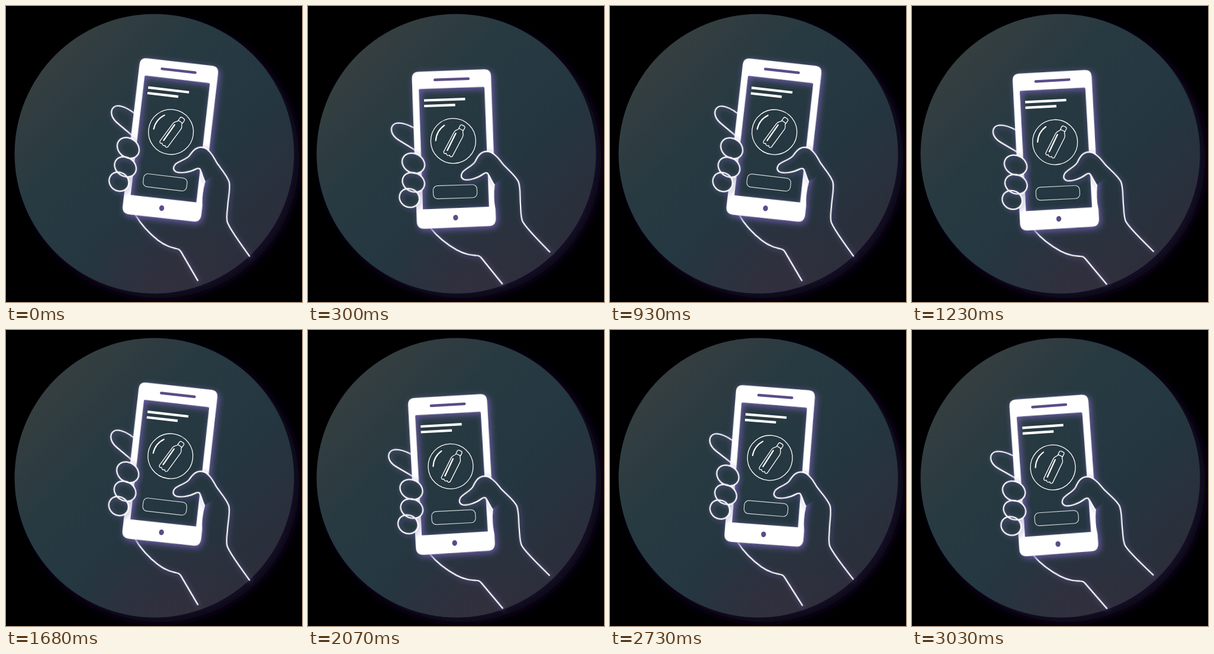
Animation, 500 px wide and 500 px high, one loop 3180 ms. Source, as an HTML page:

```html
<!DOCTYPE html>
<html lang="en">
<head>
<meta charset="utf-8">
<title>Phone in hand</title>
<style>
  html, body { margin: 0; width: 100%; height: 100%; overflow: hidden; background: #000; }
  svg { display: block; width: 100%; height: 100%; }
</style>
</head>
<body>
<svg viewBox="0 0 500 500" fill="none" stroke-linecap="round" stroke-linejoin="round">
  <defs>
    <linearGradient id="base" x1="0.1" y1="0.15" x2="0.85" y2="0.9">
      <stop offset="0" stop-color="#373f40"/>
      <stop offset=".3" stop-color="#283a41"/>
      <stop offset=".65" stop-color="#243640"/>
      <stop offset="1" stop-color="#2c2d3a"/>
    </linearGradient>
    <radialGradient id="tint" cx=".55" cy="1.02" r=".35">
      <stop offset="0" stop-color="#352f3e" stop-opacity=".8"/>
      <stop offset="1" stop-color="#352f3e" stop-opacity="0"/>
    </radialGradient>
    <filter id="halo" x="-20%" y="-20%" width="140%" height="140%">
      <feGaussianBlur stdDeviation="10"/>
    </filter>
    <filter id="glow" x="-20%" y="-20%" width="140%" height="140%">
      <feDropShadow dx="3" dy="3" stdDeviation="6" flood-color="#6f5fae"/>
    </filter>
    <filter id="lineGlow" x="-20%" y="-20%" width="140%" height="140%">
      <feDropShadow dx="2" dy="2" stdDeviation="4" flood-color="#6f5fae"/>
    </filter>
    <g id="fingertips">
      <ellipse cx="181.500" cy="262" rx="19.800" ry="16.200" transform="rotate(30 181.500 262)"/>
      <ellipse cx="181" cy="294.200" rx="19.300" ry="15.800" transform="rotate(26 181 294.200)"/>
      <ellipse cx="173.500" cy="320.500" rx="17.200" ry="15.500" transform="rotate(30 173.500 320.500)"/>
    </g>
  </defs>

  <circle cx="260" cy="258" r="235" fill="#150f2a" filter="url(#halo)"/>
  <circle cx="250.500" cy="249.500" r="236" fill="url(#base)"/>
  <circle cx="250.500" cy="249.500" r="236" fill="url(#tint)"/>

  <g id="hand" stroke="#fff" stroke-width="2.200">
    <!-- index finger and forearm, behind the phone -->
    <path filter="url(#lineGlow)" d="M183 202C176 198 168 194 158 193.500C149 193.500 145 199 145.500 206C147 216 155 221 163 226L185 240
      M209 373C222 390 237 401 252 410C266 418 276 419 285 420Q290 420 293 424L327.500 468.500"/>

    <!-- phone body with the screen cut out -->
    <path filter="url(#glow)" fill="#fff" stroke="none" fill-rule="evenodd"
      d="M181.800 119Q181.800 108 193 107.700L304 105.800Q315 105.800 315.300 117L317.500 250L318 302Q315 322 318.500 342L318.800 358Q318.500 370.300 307.500 370.500L198 373Q185.500 373 185.300 361Z
         M193 138.500Q193 137 195 136.800L302 135.200Q304 135.200 304 137L307.800 338L196 340.200Z"/>
    <path d="M220.500 122L277 121" stroke="#5a4d88" stroke-width="4.500"/>
    <ellipse cx="251" cy="355.300" rx="4.200" ry="4.800" fill="#5a4d88" stroke="none"/>

    <!-- screen content -->
    <path d="M201.500 156.300L271 155.300M201.500 165.800L254 165" stroke-width="4.200" stroke-linecap="butt"/>
    <rect x="214" y="300.500" width="74" height="22" rx="7.500" stroke-width="1.200" stroke-opacity=".8" transform="rotate(-.7 251 311)"/>
    <circle cx="249.500" cy="225.700" r="38" stroke-width="1.300"/>
    <path d="M220 224.500C221 213 226 205 235 199" stroke-width="2.100"/>
    <g transform="translate(265 203) rotate(29)" stroke-width="1.300">
      <path d="M-4.300 4V-1Q-4.300-3.500-1.500-3.500H1.500Q4.300-3.500 4.300-1V4Z"/>
      <path d="M-3.700 4C-4 8-8.300 8-8.300 14V51Q-6 55-3.300 51.500Q0 55.500 3.300 51.500Q6 55 8.300 51V14C8.300 8 4 8 3.700 4"/>
      <path d="M-4.800 14L-4 46" stroke-width="2.300"/>
    </g>

    <!-- fingertips over the left edge -->
    <use href="#fingertips" fill="#263840" stroke="none"/>
    <use href="#fingertips" filter="url(#lineGlow)"/>

    <!-- thumb over the right edge, then the outer forearm -->
    <path fill="#25363f" stroke="none" d="M317 301L306 281Q303 280 300 282C290 289 274 294 266 291Q259 287 264 279C270 272 281 269 286 261C291 251 296 245 305 244.300Q313 244.500 320 251L334 268L330 290Z"/>
    <path filter="url(#lineGlow)" d="M317 301C312 293 310 286 306 281Q303 280 300 282C290 289 274 294 266 291Q259 287 264 279C270 272 281 269 286 261C291 251 296 245 305 244.300Q313 244.500 319 250.500C327 257 329 262 334 268C342 277 352 285 358 296C362 306 360 320 361 336C361.500 350 361 357 364 364C370 376 390 396 408.700 416.300"/>
  </g>
</svg>
<script>
  const STEP = 30, LOOP = 3180, LAST = 101;
  const RIGHT = 6.95, LEFT = -4, REST = -0.7;
  // step positions of the turning points, alternating right and left
  const turns = [-0.8, 14.5, 29.5, 44.1, 57.4, 71.8, 86.2, 102.3];
  const hand = document.getElementById('hand');

  function angleAt(step) {
    let i = 0;
    while (step >= turns[i + 1]) i++;
    const p = (step - turns[i]) / (turns[i + 1] - turns[i]);
    const swing = Math.cos(Math.PI * (p + i));
    return (RIGHT + LEFT) / 2 + (RIGHT - LEFT) / 2 * swing;
  }

  function draw(ms) {
    const step = Math.min(LAST, Math.floor((ms % LOOP) / STEP));
    hand.setAttribute('transform', `rotate(${angleAt(step) - REST} 362 439)`);
  }

  const start = performance.now();
  function tick() {
    draw(performance.now() - start);
    requestAnimationFrame(tick);
  }
  tick();
</script>
</body>
</html>
```
